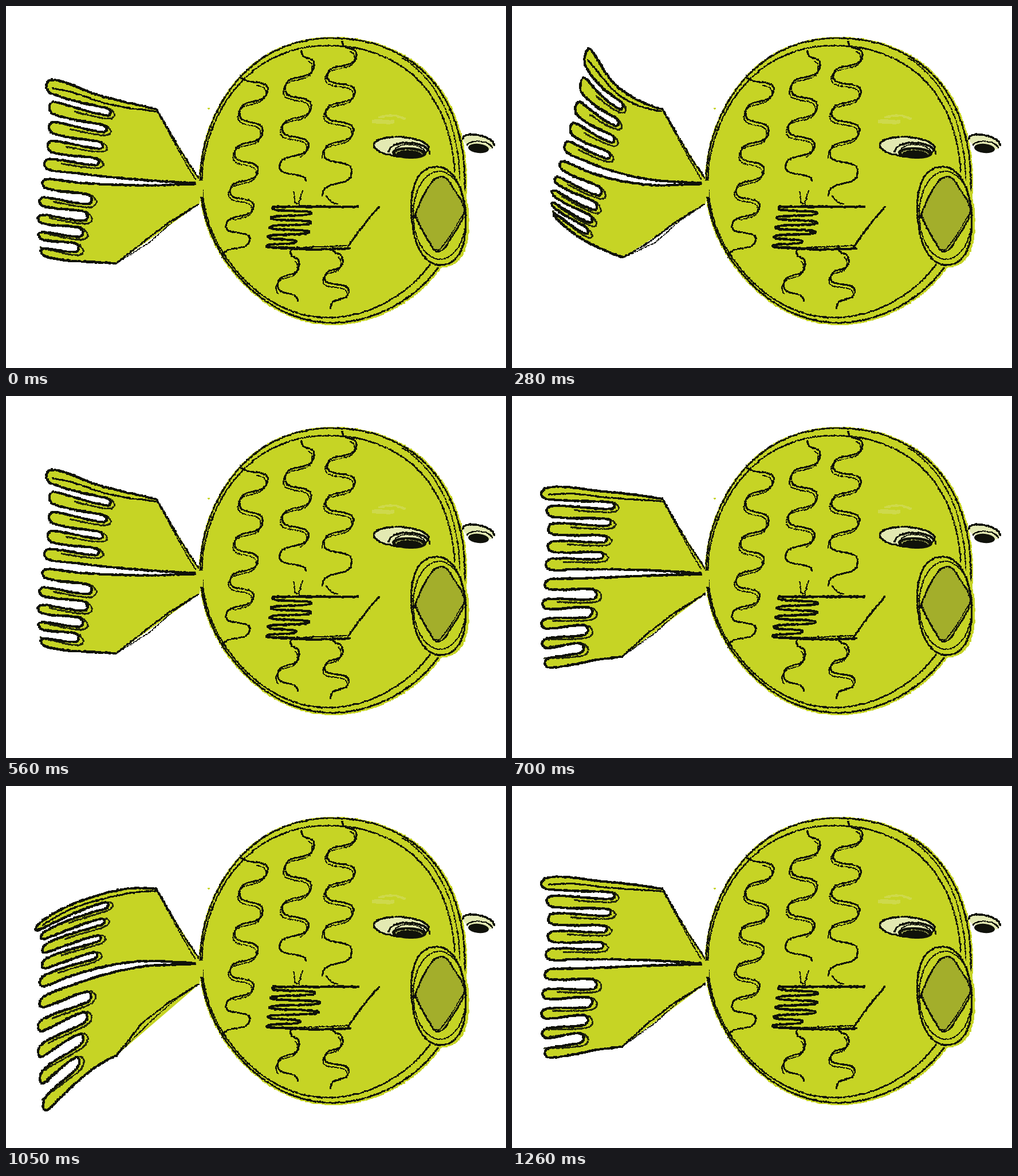
Recreate the animation shown at these times as an HTML page with a canvas. Size 873 by 633 pixels, loop 1330 ms.

```html
<!DOCTYPE html>
<html lang="en">
<head>
<meta charset="utf-8">
<title>Swimming fish</title>
<style>
html, body { margin: 0; width: 100%; height: 100%; overflow: hidden; background: #fff; }
canvas { display: block; }
</style>
</head>
<body>
<canvas id="stage" width="873" height="633"></canvas>
<script>
const W = 873, H = 633, STEP = 70, LOOP = 1330;
const GREEN = '#c6d425', BLACK = '#10120a', PALE = '#e3e9b2', OLIVE = '#a3ae2b', SHINE = '#ced94c';
const { sin, cos, PI, sqrt, pow, max, min, hypot, round } = Math;
const ctx = document.getElementById('stage').getContext('2d');

let seed = 1;
const rand = () => (seed = (seed * 16807) % 2147483647) / 2147483647;
const range = n => Array.from({ length: n }, (_, i) => i);
const shift = (pts, dx, dy) => pts.map(([x, y]) => [x + dx, y + dy]);

// Hermite spline whose tangents are scaled to each chord, so it never overshoots
function curve(pts) {
  const at = i => pts[max(0, min(pts.length - 1, i))];
  const tangent = i => {
    const a = at(i - 1), b = at(i + 1), d = hypot(b[0] - a[0], b[1] - a[1]);
    return [(b[0] - a[0]) / d, (b[1] - a[1]) / d];
  };
  const out = [];
  for (let i = 0; i < pts.length - 1; i++) {
    const a = at(i), b = at(i + 1), ta = tangent(i), tb = tangent(i + 1);
    const d = hypot(b[0] - a[0], b[1] - a[1]), steps = max(2, round(d / 4));
    for (let k = 0; k < steps; k++) {
      const s = k / steps, s2 = s * s, s3 = s2 * s;
      out.push([0, 1].map(c =>
        (2 * s3 - 3 * s2 + 1) * a[c] + (s3 - 2 * s2 + s) * d * ta[c] +
        (3 * s2 - 2 * s3) * b[c] + (s3 - s2) * d * tb[c]));
    }
  }
  out.push(at(pts.length - 1));
  return out;
}

// Joins left and right turning points with flat S-bends
function meander(turns) {
  const out = [];
  for (let i = 0; i < turns.length - 1; i++) {
    const [ax, ay] = turns[i], [bx, by] = turns[i + 1], pull = .75 * (by - ay);
    for (const k of range(17)) {
      const s = k / 16, r = 1 - s;
      const c1 = 3 * r * r * s, c2 = 3 * r * s * s, near = r * r * r, far = s * s * s;
      out.push([(near + c1) * ax + (c2 + far) * bx,
        near * ay + c1 * (ay + pull) + c2 * (by - pull) + far * by]);
    }
  }
  return out;
}

function oval(cx, cy, rx, ry, tilt = 0, shape = () => 1, from = 0, to = 2 * PI) {
  return range(81).map(i => {
    const a = from + (to - from) * i / 80, r = shape(a);
    const x = rx * r * cos(a), y = ry * r * sin(a);
    return [cx + x * cos(tilt) - y * sin(tilt), cy + x * sin(tilt) + y * cos(tilt)];
  });
}

// Grainy crayon stroke
function ink(g, poly, size = 2.4, color = BLACK) {
  g.fillStyle = color;
  for (let i = 1; i < poly.length; i++) {
    const [ax, ay] = poly[i - 1], [bx, by] = poly[i];
    const n = max(1, Math.ceil(hypot(bx - ax, by - ay)));
    for (let k = 0; k < n; k++) {
      const s = max(1, round(size + (rand() - .5) * 1.6));
      const x = ax + (bx - ax) * k / n + (rand() - .5) * 1.5 - s / 2;
      const y = ay + (by - ay) * k / n + (rand() - .5) * 1.5 - s / 2;
      g.fillRect(round(x), round(y), s, s);
    }
  }
}

function fill(g, poly, color) {
  g.fillStyle = color;
  g.beginPath();
  poly.forEach(([x, y]) => g.lineTo(x, y));
  g.fill();
}

function blob(g, poly, color, size) {
  fill(g, poly, color);
  ink(g, poly, size);
}

// Fuller at the upper right, flatter at the lower left
const lumpy = a => 1 + pow(sin(2 * a), 2) * (.005 + .025 * cos(a + PI / 4));

function drawStripe(g, { x, y, lean, amp, step, grow, turns, lead }) {
  const keys = range(turns).map(k => {
    const side = k % 2 ? -1 : 1, ty = y + step * k + grow * k * k + (k % 2 ? 6 : 0);
    return [x - lean * (ty - y) + side * amp, ty];
  });
  const path = meander([[x + amp - lead, y - 24], ...keys]);
  ink(g, path, 2.2);
  ink(g, shift(path.slice(10, turns * 13), -3, 5), 1.5);
}

function drawBody(g) {
  const outer = oval(570, 305, 231, 249, 0, lumpy);
  ink(g, shift(outer, 1, 1), 5, GREEN);
  fill(g, outer, GREEN);
  ink(g, outer, 2.2);
  ink(g, oval(563, 307, 221, 238, 0, lumpy), 2);
  ink(g, oval(568, 306, 224, 250, 0, lumpy, -1, .1), 1.6);

  [
    { x: 435, y: 145, lean: .12, amp: 22, step: 38, grow: -.65, turns: 10, lead: 48 },
    { x: 514, y: 103, lean: .07, amp: 24, step: 37, grow: -.5, turns: 7, lead: 22 },
    { x: 587, y: 86, lean: .04, amp: 25, step: 30.5, grow: .55, turns: 8, lead: 25 },
    { x: 494, y: 452, lean: .04, amp: 18, step: 30, grow: 1, turns: 3, lead: 15 },
    { x: 569, y: 445, lean: -.2, amp: 19, step: 26, grow: 0, turns: 4, lead: 18 }
  ].forEach(stripe => drawStripe(g, stripe));
  ink(g, [[503, 325], [504, 343], [511, 346], [518, 322]], 1.8);
  ink(g, [[559, 332], [568, 343], [581, 347]], 2);

  ink(g, [[642, 202], [676, 203]], 6, SHINE);
  ink(g, [[652, 194], [675, 191], [698, 197]], 3, SHINE);
  ink(g, [[352, 179], [355, 180]], 2, GREEN);
  drawEyes(g);
  drawMouth(g);
}

function drawEyes(g) {
  blob(g, oval(690, 246, 48, 17, .06), PALE, 2.5);
  ink(g, oval(704, 257, 36, 18, .06, undefined, PI, 2 * PI), 2.3);
  fill(g, oval(704, 257, 30, 10, .04), BLACK);
  ink(g, oval(705, 256, 27, 14, .06, undefined, PI, 2 * PI), 1.5);
  ink(g, oval(704, 259, 23, 7, .04, undefined, PI, 2 * PI), 1, '#92994f');

  const far = oval(825, 238, 28, 12, .25);
  fill(g, far, PALE);
  ink(g, far.slice(38), 2.7);
  fill(g, oval(825, 249, 18, 8, .1), BLACK);
  ink(g, oval(827, 246, 22, 9, .1, undefined, PI, 2 * PI), 1.6);
}

function drawMouth(g) {
  const lips = oval(755, 367, 47, 86, -.08, a => 1 + .04 * pow(sin(2 * a), 2));
  ink(g, shift(lips, 3, 1), 5, GREEN);
  blob(g, lips, GREEN, 2.4);
  ink(g, oval(757, 366, 46, 77, -.02), 1.7);
  const hole = curve([[713, 366], [737, 317], [753, 300], [767, 300], [780, 317], [800, 358],
    [776, 407], [755, 430], [738, 411], [713, 366]]);
  blob(g, hole, OLIVE, 2.2);
  ink(g, [[715, 363], [729, 398], [746, 425], [757, 427], [778, 399], [799, 363]], 1.5);
}

const FINGERS = 5;
const upperRule = {
  left: k => 51 + 12 * sqrt(sin(PI * k / 4.6)), top: k => 161 + 31 * k, thick: 19,
  end: k => 179 - 6.5 * k, drop: k => 6 - 2 * k
};
const lowerRule = {
  left: k => 57 - 6 * sin(PI * k / 4), top: k => 321 + 34.3 * k, thick: 17,
  end: k => 148 - 7.5 * k, drop: k => -3 * k
};

function fin({ left, top, thick, end, drop }, start, finish) {
  const pts = [...start], echoes = [], r = thick * .45;
  for (const k of range(FINGERS)) {
    const x = left(k), y = top(k), bottom = y + thick;
    pts.push([x + r, y], [x, y + thick / 2], [x + r, bottom]);
    if (k === FINGERS - 1) break;
    const next = top(k + 1), e = end(k), d = drop(k), gap = next - bottom;
    pts.push([e - gap * .4, bottom + d], [e, bottom + gap / 2 + d], [e - gap * .4, next + d]);
    echoes.push(curve([[e - 60, bottom + d / 2 + 2], [e - 2, bottom + d + 1],
      [e + 8, bottom + gap / 2 + d + 4], [e - 2, next + d + 5], [e - 70, next + d / 2 + 5]]));
  }
  return { edge: curve([...pts, ...finish]), echoes };
}

const upper = fin(upperRule, [[262, 180], [210, 172], [150, 166], [95, 159]],
  [[110, 303], [220, 304], [332, 310]]);
const lower = fin(lowerRule, [[332, 311], [220, 315], [120, 319]],
  [[110, 469], [150, 461], [192, 456]]);
const topEcho = curve([[64, 172], [110, 171], [170, 178], [262, 184]]);

// Bend grows towards the tips; both outer corners swing furthest
function bend(poly, p) {
  const base = p > 0 ? 46 : 53;
  return poly.map(([x, y]) => {
    const w = pow(max(0, 265 - x) / 215, 1.7);
    const v = (y - 300) / 150, u = max(0, 475 - y) / 310;
    const dx = p > 0 ? pow(p, 1.4) * (12 + 50 * pow(u, 2.2)) : -p * 7 * max(0, v);
    return [x + dx * w, y - p * w * (base + 37 * v * v)];
  });
}

function drawTail(p) {
  const top = bend(upper.edge, p), bottom = bend(lower.edge, p);
  const corner = bottom[bottom.length - 1];
  fill(ctx, [...top, [341, 308]], GREEN);
  fill(ctx, [...bottom, [338, 346], [341, 312]], GREEN);
  [...upper.echoes, ...lower.echoes].forEach(e => ink(ctx, bend(e, p), 2.2, '#24280e'));
  ink(ctx, bend(topEcho, p), 2.2);
  ink(ctx, top, 3.2);
  ink(ctx, bottom, 3.2);
  ink(ctx, [[262, 179], [309, 260], [338, 303]], 2.2);
  ink(ctx, [[264, 184], [311, 270], [331, 304]], 1.7);
  ink(ctx, [corner, [238, 414], [285, 378], [337, 346]], 2.2);
  ink(ctx, [corner, [250, 414], [291, 377], [325, 354]], 1.4);
}

// Positive stretch pulls the fingertips left, negative pushes the gaps right
function drawHand(stretch) {
  const turns = range(9).map(k => {
    const bulge = sin(PI * k / 8), inner = k % 2;
    const x = inner ? 533 - 26 * pow(k / 7, 6) : 465 - 1.3 * k;
    const reach = stretch > 0 ? (inner ? 6 : 22) : (inner ? 18 : 0);
    return [x - stretch * reach * bulge, 354 + 8.3 * k];
  });
  const path = meander([...turns, [505, 425]]);
  ink(ctx, path, 3.2);
  ink(ctx, [[466, 351], [616, 351]], 3.6);
  ink(ctx, [[478, 423], [540, 426], [602, 424]], 3.4);
  ink(ctx, [[500, 423], [597, 419]], 1.8);
  ink(ctx, [[597, 421], [613, 398], [630, 376], [652, 350]], 2.7);
}

// Upswing lasts 700 ms, a short rest, then a 560 ms downswing
function swing(t) {
  const s = (t + STEP) % LOOP;
  if (s <= 700) return 1.2 * pow(max(0, sin(PI * s / 700)), .85);
  if (s <= 770) return 0;
  return -1.08 * sin(PI * (s - 770) / 560);
}
const grasp = t => t > 840 && t < 1120 ? sin(2 * PI * (t - 840) / 280) : 0;

const fish = document.createElement('canvas');
fish.width = W;
fish.height = H;
seed = 77;
drawBody(fish.getContext('2d'));

let shown = -1;
function frame() {
  const t = Math.floor(performance.now() % LOOP / STEP) * STEP;
  if (t !== shown) {
    shown = t;
    seed = 4242;
    ctx.fillStyle = '#fff';
    ctx.fillRect(0, 0, W, H);
    drawTail(swing(t));
    ctx.drawImage(fish, 0, 0);
    fill(ctx, [[331, 306], [344, 305], [344, 334], [335, 333]], GREEN);
    drawHand(grasp(t));
  }
  requestAnimationFrame(frame);
}
frame();
</script>
</body>
</html>
```
